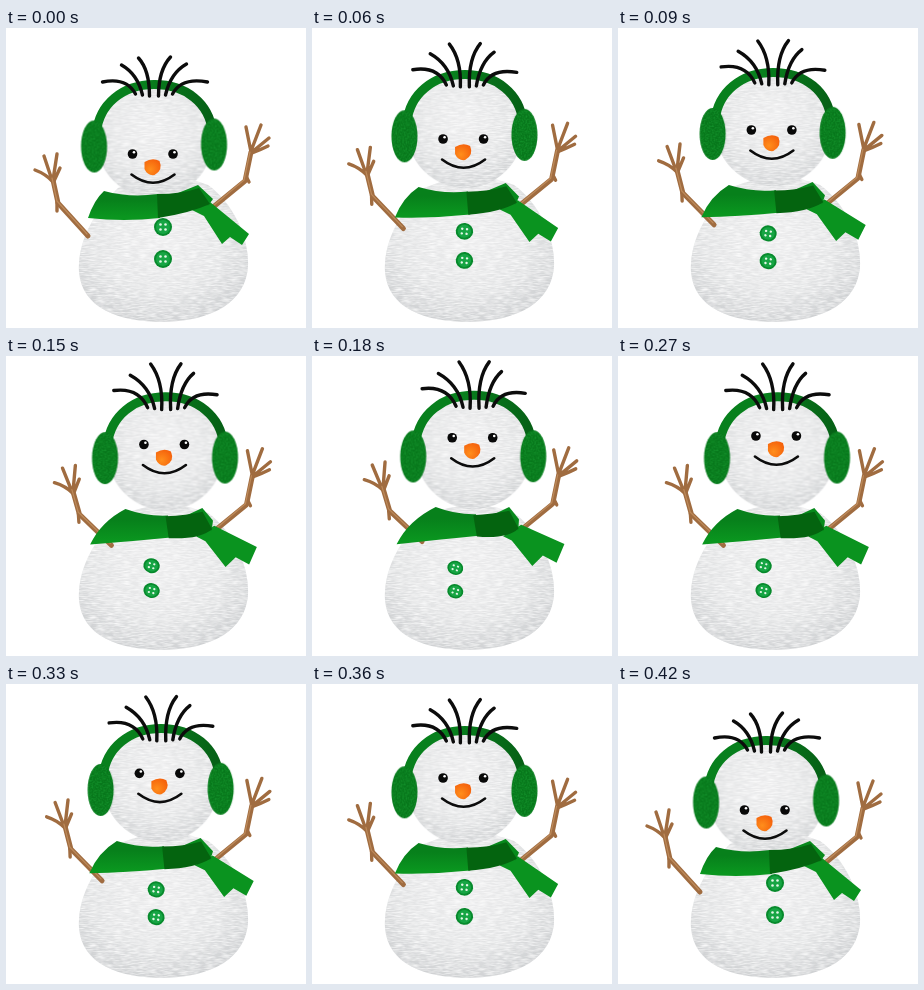
Write an HTML page that moves like this. It is 300 px wide and 300 px high and loops after 0.45 s.

```html
<!DOCTYPE html>
<html lang="en">
<head>
<meta charset="utf-8">
<title>Snowman</title>
<style>
html, body { margin: 0; width: 100%; height: 100%; overflow: hidden; background: #fff; }
svg { display: block; width: 100vw; height: 100vh; }
</style>
</head>
<body>
<svg viewBox="0 0 300 300">
  <defs>
    <radialGradient id="snow" cx=".48" cy=".42" r=".62">
      <stop offset="0" stop-color="#ededee"/>
      <stop offset=".6" stop-color="#e3e4e5"/>
      <stop offset="1" stop-color="#cdcfd1"/>
    </radialGradient>
    <radialGradient id="carrot" cx=".35" cy=".65" r=".7">
      <stop offset="0" stop-color="#ff8e1c"/>
      <stop offset="1" stop-color="#f5620c"/>
    </radialGradient>
    <linearGradient id="band">
      <stop offset=".4" stop-color="#08801d"/>
      <stop offset="1" stop-color="#066016"/>
    </linearGradient>
    <linearGradient id="cloth" x2="0" y2="1">
      <stop offset=".3" stop-color="#07801b"/>
      <stop offset=".9" stop-color="#0a961f"/>
    </linearGradient>
    <filter id="streaks" x="0" y="0" width="1" height="1" color-interpolation-filters="sRGB">
      <feTurbulence type="fractalNoise" baseFrequency=".12 .7" numOctaves="2" seed="4"/>
      <feColorMatrix values="0 0 0 0 1  0 0 0 0 1  0 0 0 0 1  1.5 0 0 0 -.5"/>
      <feComposite in2="SourceAlpha" operator="in" result="n"/>
      <feMerge><feMergeNode in="SourceGraphic"/><feMergeNode in="n"/></feMerge>
    </filter>
    <filter id="wool" x="0" y="0" width="1" height="1" color-interpolation-filters="sRGB">
      <feTurbulence type="fractalNoise" baseFrequency=".6" numOctaves="1" seed="2"/>
      <feColorMatrix values="0 0 0 0 .1  0 0 0 0 .62  0 0 0 0 .2  1.6 0 0 0 -.6"/>
      <feComposite in2="SourceAlpha" operator="in" result="n"/>
      <feMerge><feMergeNode in="SourceGraphic"/><feMergeNode in="n"/></feMerge>
    </filter>
    <g id="button">
      <circle r="9" fill="#078a2c"/>
      <circle r="7" fill="#17a544"/>
      <g fill="#e4f7e8">
        <circle cx="-2.5" cy="-2.5" r="1.3"/><circle cx="2.5" cy="-2.5" r="1.3"/>
        <circle cx="-2.5" cy="2.5" r="1.3"/><circle cx="2.5" cy="2.5" r="1.3"/>
      </g>
    </g>
    <g id="eye">
      <circle r="4.8" fill="#080808"/>
      <circle cx="1.5" cy="-1.8" r="1.3" fill="#fff"/>
    </g>
  </defs>

  <path fill="url(#snow)" filter="url(#streaks)" d="M112 160C90 182 71 212 73 244C76 280 112 294 158 294C206 293 240 274 242 238C243 210 228 176 202 157Q158 140 112 160Z"/>
  <use id="top" href="#button"/>
  <use id="low" href="#button"/>

  <g fill="none" stroke="#a06c40" stroke-linecap="round" stroke-linejoin="round">
    <g id="left">
      <path stroke-width="5" d="M82 208L52 175L47 152"/>
      <path stroke-width="3.4" d="M51 174L51 183M47 154Q40 146 29 142M46 152L38 128M47 152L51 126M48 153L54 140"/>
      <path stroke="#bd8a5a" stroke-width="1.2" d="M81 206L51 173L46 150"/>
    </g>
    <g id="right">
      <path stroke-width="5" d="M206 180L239 153L245 124"/>
      <path stroke-width="3.4" d="M240 148L243 154M245 124L240 99M245 123L255 97M246 124L263 110M246 125Q254 122 262 118"/>
      <path stroke="#bd8a5a" stroke-width="1.2" d="M207 178L238 152L244 124"/>
    </g>
  </g>

  <g id="head">
    <ellipse cx="149" cy="111.500" rx="58" ry="58.500" fill="url(#snow)" filter="url(#streaks)"/>
    <path fill="none" stroke="url(#band)" stroke-width="9" d="M91 104C94 76 117 56.500 149 56.500S204 76 207 104"/>
    <g fill="#07771b" filter="url(#wool)">
      <ellipse cx="88.500" cy="118" rx="13" ry="26"/>
      <ellipse cx="208.500" cy="117" rx="13" ry="26"/>
    </g>
  </g>

  <path id="hair" fill="none" stroke="#0c0c0c" stroke-width="3.4" stroke-linecap="round"/>

  <g id="face">
    <use href="#eye" x="127"/>
    <use href="#eye" x="167.500"/>
    <path fill="url(#carrot)" d="M139 8Q147 3 154 7Q158 16 149 21Q142 22 139 15Z"/>
    <path fill="none" stroke="#0c0c0c" stroke-width="2.6" stroke-linecap="round" d="M126 20.500Q147.500 37 169 20.500"/>
  </g>

  <path id="tail" fill="#0a931f"/>
  <path id="wrap" fill="url(#cloth)"/>
  <path id="fold" fill="#078a1c"/>
  <path id="knot" fill="#04640f"/>
</svg>
<script>
const STEP = 30, COUNT = 15, HALF = 7;
const el = id => document.getElementById(id);

// scarf parts: low pose, raised pose
const scarf = {
  tail: ["M186 182L204 174L243 206L236 217L224 209L216 216L198 188Z",
         "M192 180L210 168L254 185L246 205L232 198L221 209L200 184Z"],
  wrap: ["M82 190Q88 172 98 163Q124 170 152 166L154 190Q118 194 82 190Z",
         "M85 188Q98 163 128 149Q148 157 166 157L169 178Q126 182 85 188Z"],
  fold: ["M172 165L192 157L207 171L202 178Z",
         "M182 158L198 150L207 162L207 174Z"],
  knot: ["M151 166Q176 166 193 160L204 176Q184 185 152 190Z",
         "M163 158Q182 157 198 154L207 172Q197 183 167 179Z"]
};
const locks = [
  "M130 66Q121 49 97 54M137 67Q132 46 116 37M144 68Q144 42 133 30" +
  "M153 68Q153 42 165 29M160 67Q165 45 181 36M167 66Q176 49 202 54",
  "M147 49Q138 28 113 31M154 50Q149 27 129 16M161 51Q163 22 150 4" +
  "M170 51Q168 20 180 4M177 50Q180 25 192 14M184 49Q192 32 216 36"
];
const faceKeys = [[0, 126], [2, 111], [3, 102], [7, 75], [9, 80], [12, 94], [13, 106], [14, 126]];

function mix([a, b], u) {
  const to = b.match(/[\d.]+/g);
  let i = 0;
  return a.replace(/[\d.]+/g, v => (+v + (to[i++] - v) * u).toFixed(2));
}

function keyed(keys, n) {
  const i = Math.max(1, keys.findIndex(k => k[0] >= n));
  const [n0, v0] = keys[i - 1], [n1, v1] = keys[i];
  return v0 + (v1 - v0) * (n - n0) / (n1 - n0);
}

const place = (id, x, y, more = "") =>
  el(id).setAttribute("transform", `translate(${x} ${y})${more}`);

function draw(ms) {
  const n = Math.floor(ms / STEP) % COUNT;
  const q = 1 - Math.abs(n - HALF) / HALF;
  const rise = Math.sqrt(q);
  const turn = ` rotate(${20 * q}) scale(${1 - 0.12 * q} ${1 - 0.25 * q})`;

  place("left", 28 * q, -23 * q, ` rotate(${-5 * q} 47 152)`);
  place("right", 2 * q, -6 * q);
  place("top", 157 - 16 * q, 199 + 15 * q, turn);
  place("low", 157 - 16 * q, 231 + 5 * q, turn);
  place("head", 15.5 * q - 0.5, -18.5 * rise, ` rotate(${q - 0.5} 149 111)`);
  place("face", 16 * q - 0.5, keyed(faceKeys, n));

  // hair lifts ahead of its sideways drift
  el("hair").setAttribute("d", mix(locks, rise));
  place("hair", 17 * (q - rise) - 0.5, 0);
  for (const id in scarf) el(id).setAttribute("d", mix(scarf[id], q));
}

const start = performance.now();
function tick() {
  draw(performance.now() - start);
  requestAnimationFrame(tick);
}
tick();
</script>
</body>
</html>
```
